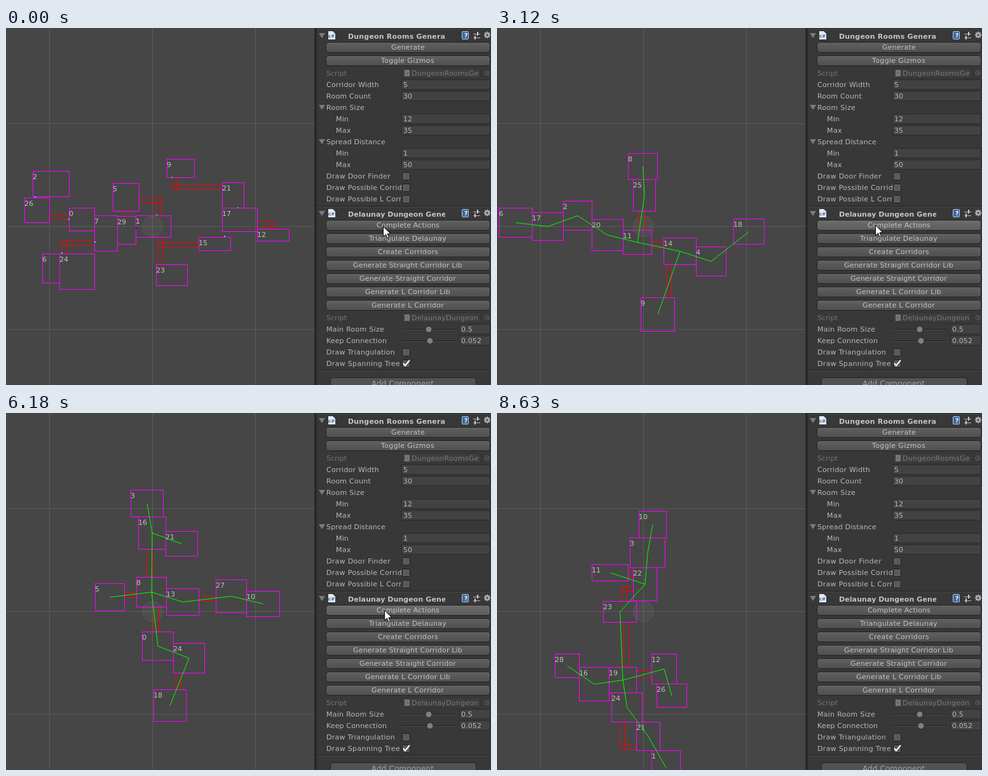
Recreate the animation shown at these times as an HTML page with a canvas. Size 763 by 562 pixels, loop 9.16 s.

```html
<!DOCTYPE html>
<html lang="en">
<head>
<meta charset="utf-8">
<title>Dungeon generator</title>
<style>
html, body { margin: 0; width: 100%; height: 100%; overflow: hidden; background: #464646; }
canvas { display: block; }
</style>
</head>
<body>
<canvas id="stage" width="763" height="562"></canvas>
<script>
const ctx = document.getElementById("stage").getContext("2d");
const LOOP = 9160;
const FONT = '"DejaVu Sans", Verdana, sans-serif';
const MAGENTA = "#ff00ff", RED = "#ff0000", GREEN = "#00ff00", CYAN = "#00ffff", BLUE = "#0000ff";

// ---------- drawing helpers ----------
function rect(x, y, w, h, color) {
  ctx.fillStyle = color;
  ctx.fillRect(x, y, w, h);
}

// Letter spacing that gives a string the length it has with whole-pixel advances
const spacings = new Map();
function snapSpacing(str) {
  const key = ctx.font + str;
  if (!spacings.has(key)) {
    ctx.letterSpacing = "0px";
    let snapped = 0;
    for (const ch of str) snapped += Math.round(ctx.measureText(ch).width + 0.05);
    spacings.set(key, (snapped - ctx.measureText(str).width) / str.length);
  }
  return spacings.get(key);
}

function text(str, x, y, { color = "#b9b9b9", size = 11, bold = false, align = "left", clip = 763 } = {}) {
  ctx.save();
  ctx.beginPath();
  ctx.rect(0, 0, clip, 562);
  ctx.clip();
  ctx.font = `${bold ? "bold " : ""}${size}px ${FONT}`;
  ctx.letterSpacing = snapSpacing(str) + "px";
  if (align === "center") x = Math.round(x - ctx.measureText(str).width / 2);
  ctx.fillStyle = color;
  ctx.fillText(str, x, y);
  ctx.restore();
}

function poly(points, fill, stroke) {
  ctx.beginPath();
  points.forEach(([x, y]) => ctx.lineTo(x, y));
  ctx.closePath();
  if (fill) { ctx.fillStyle = fill; ctx.fill(); }
  if (stroke) { ctx.strokeStyle = stroke; ctx.lineWidth = 1; ctx.stroke(); }
}

function roundBox(x, y, w, h, r, fill, stroke) {
  ctx.beginPath();
  ctx.roundRect(x + 0.5, y + 0.5, w - 1, h - 1, r);
  ctx.fillStyle = fill;
  ctx.fill();
  ctx.strokeStyle = stroke;
  ctx.lineWidth = 1;
  ctx.stroke();
}

function disc(x, y, r, fill, stroke) {
  ctx.beginPath();
  ctx.arc(x, y, r, 0, Math.PI * 2);
  if (fill) { ctx.fillStyle = fill; ctx.fill(); }
  if (stroke) { ctx.strokeStyle = stroke; ctx.lineWidth = 1; ctx.stroke(); }
}

function across(color, x1, x2, ...ys) {
  ys.forEach(y => rect(x1, y, x2 - x1 + 1, 1, color));
}

function down(color, y1, y2, ...xs) {
  xs.forEach(x => rect(x, y1, 1, y2 - y1 + 1, color));
}

// ---------- dungeon ----------
let rooms = new Map();

function room(id, x1, y1, x2, y2) {
  rooms.set(id, { id, x1, y1, x2, y2 });
}

const hall = (...args) => across(RED, ...args);
const shaft = (...args) => down(RED, ...args);

function door(color, x, y) {
  rect(x, y, 2, 2, color);
}

// Paints the rooms, then chains such as "4-8-2 8-5" between room centres
function tree(chains = "") {
  rooms.forEach(({ x1, y1, x2, y2 }) => {
    across(MAGENTA, x1, x2, y1, y2);
    down(MAGENTA, y1, y2, x1, x2);
  });
  rooms.forEach(r => text(String(r.id), r.x1, r.y1 + 13, { color: "#c0c0c0" }));
  ctx.strokeStyle = GREEN;
  ctx.lineWidth = 1;
  for (const chain of chains.split(" ")) {
    ctx.beginPath();
    for (const id of chain.split("-")) {
      const r = rooms.get(Number(id));
      if (r) ctx.lineTo((r.x1 + r.x2) / 2 + 0.5, (r.y1 + r.y2) / 2 + 0.5);
    }
    ctx.stroke();
  }
}

function harbor() {
  room(2, 42, 225, 99, 265);
  room(26, 29, 267, 68, 306);
  room(0, 99, 283, 139, 319);
  room(7, 139, 295, 175, 351);
  room(29, 175, 296, 204, 340);
  room(1, 204, 295, 259, 329);
  room(5, 168, 244, 209, 288);
  room(9, 253, 206, 296, 235);
  room(21, 340, 243, 374, 283);
  room(17, 340, 283, 395, 320);
  room(12, 395, 316, 445, 335);
  room(15, 303, 329, 353, 350);
  room(23, 236, 372, 285, 405);
  room(6, 57, 355, 84, 401);
  room(24, 84, 355, 139, 411);
  hall(68, 99, 293, 301);
  hall(238, 303, 337, 345);
  hall(87, 139, 334, 342);
  shaft(334, 355, 87, 95);
  hall(209, 244, 267, 275);
  shaft(267, 295, 236, 244);
  hall(261, 340, 246, 254);
  shaft(235, 254, 261, 269);
  shaft(288, 296, 186, 194);
  hall(395, 424, 304, 312);
  shaft(304, 316, 416, 424);
  shaft(329, 372, 238, 246);
  tree();
  door(CYAN, 45, 265); door(CYAN, 98, 300); door(CYAN, 139, 336);
  door(CYAN, 87, 353); door(CYAN, 343, 327);
  door(GREEN, 260, 234); door(GREEN, 236, 293); door(GREEN, 364, 282);
  door(BLUE, 204, 314);
}

function bridge() {
  room(2, -52, 318, -6, 366);
  room(1, 5, 312, 45, 361);
  room(15, 45, 274, 102, 325);
  room(22, 102, 282, 157, 325);
  room(7, 157, 291, 210, 342);
  room(20, 196, 243, 237, 291);
  room(19, 185, 178, 233, 214);
  room(12, 225, 214, 277, 243);
  room(24, 277, 186, 327, 243);
  room(27, 248, 291, 295, 333);
  room(25, 295, 338, 348, 364);
  room(5, 403, 251, 437, 306);
  room(10, 235, 369, 278, 414);
  room(0, 241, 414, 293, 468);
  hall(303, 403, 291, 299);
  shaft(291, 338, 316, 324);
  hall(194, 225, 222, 230);
  shaft(214, 230, 194, 202);
  shaft(214, 243, 198, 206);
  hall(237, 285, 275, 283);
  shaft(275, 291, 277, 285);
  hall(278, 342, 380, 388);
  shaft(364, 388, 334, 342);
  tree("2-1-15-22-7-20-19-12-24 20-27-25-5 25-10-0");
}

function tower() {
  room(28, 249, 52, 272, 105);
  room(21, 243, 105, 295, 162);
  room(12, 217, 206, 274, 233);
  room(18, 210, 233, 251, 280);
  room(13, 102, 267, 136, 319);
  room(3, 52, 306, 102, 351);
  room(19, 136, 293, 155, 348);
  room(9, 217, 323, 259, 372);
  room(17, 280, 309, 317, 356);
  room(15, 272, 356, 325, 403);
  room(14, 291, 280, 347, 299);
  room(16, 178, 418, 223, 473);
  room(4, 241, 418, 295, 452);
  room(0, 83, 432, 136, 470);
  room(24, 249, 452, 288, 499);
  shaft(162, 206, 249, 257);
  shaft(280, 323, 236, 244);
  hall(155, 217, 338, 346);
  hall(259, 280, 342, 350);
  shaft(299, 309, 297, 305);
  shaft(403, 418, 274, 282);
  hall(223, 241, 427, 435);
  hall(136, 178, 458, 466);
  tree("28-21-12-18-9-19-13-3 9-17-14 9-15-4-16-0 4-24");
}

function ridge() {
  room(6, 3, 283, 55, 329);
  room(17, 55, 290, 104, 334);
  room(2, 104, 272, 149, 318);
  room(20, 149, 301, 198, 350);
  room(11, 198, 318, 243, 356);
  room(8, 206, 197, 252, 238);
  room(25, 214, 238, 249, 288);
  room(14, 262, 330, 313, 372);
  room(4, 313, 344, 360, 390);
  room(18, 372, 300, 420, 340);
  room(9, 226, 424, 279, 477);
  hall(243, 262, 336, 344);
  shaft(288, 318, 224, 232);
  shaft(372, 424, 266, 274);
  tree("6-17-2-20-11-25-8 11-14-4-18 14-9");
}

function fork() {
  room(0, 125, 251, 181, 285);
  room(22, 181, 286, 219, 338);
  room(16, 219, 262, 262, 298);
  room(21, 219, 329, 261, 384);
  room(15, 165, 338, 219, 367);
  room(5, 87, 338, 125, 390);
  room(14, 227, 384, 280, 424);
  room(12, 262, 424, 319, 476);
  room(8, 298, 337, 332, 387);
  room(23, 298, 298, 345, 337);
  room(26, 298, 249, 338, 298);
  room(7, 345, 257, 397, 298);
  room(1, 345, 298, 397, 345);
  hall(181, 206, 266, 274);
  shaft(266, 286, 198, 206);
  hall(125, 165, 354, 362);
  hall(280, 321, 406, 414);
  shaft(387, 414, 313, 321);
  tree("0-22-16 22-15-5 15-21-14-12 14-8-23-26 23-1-7");
  door(BLUE, 383, 297);
  door(GREEN, 312, 386);
}

function hook() {
  room(29, 212, 146, 266, 180);
  room(10, 243, 180, 267, 236);
  room(28, 267, 217, 324, 236);
  room(18, 249, 262, 304, 301);
  room(22, 248, 301, 303, 342);
  room(1, 240, 342, 285, 385);
  room(12, 285, 342, 338, 393);
  room(4, 240, 393, 296, 440);
  room(14, 186, 393, 240, 431);
  room(23, 147, 379, 167, 435);
  room(19, 112, 337, 167, 379);
  room(7, 348, 251, 405, 301);
  room(11, 348, 301, 405, 351);
  room(13, 348, 351, 398, 406);
  room(26, 405, 311, 440, 366);
  shaft(236, 262, 294, 302);
  shaft(385, 393, 250, 258);
  hall(338, 348, 364, 372);
  hall(167, 186, 418, 426);
  tree("29-10-28-18-22-1-4-14-23-19 22-12 1-12-13-11-7 11-26");
  door(BLUE, 281, 300); door(BLUE, 379, 300); door(BLUE, 286, 382);
}

function spiral() {
  room(3, 196, 121, 247, 163);
  room(16, 208, 163, 251, 214);
  room(21, 251, 186, 301, 225);
  room(8, 205, 258, 252, 305);
  room(13, 252, 276, 303, 318);
  room(5, 140, 268, 186, 311);
  room(27, 330, 262, 378, 314);
  room(10, 378, 280, 430, 320);
  room(0, 214, 344, 263, 389);
  room(24, 263, 362, 312, 409);
  room(18, 232, 435, 283, 485);
  shaft(214, 258, 222, 230);
  hall(186, 205, 282, 290);
  hall(303, 330, 288, 296);
  shaft(305, 344, 232, 240);
  shaft(409, 435, 267, 275);
  tree("3-16-21 16-8-5 8-13-27-10 8-0-24-18");
}

function court() {
  room(1, 155, 112, 204, 165);
  room(23, 249, 108, 290, 160);
  room(2, 227, 160, 271, 202);
  room(11, 270, 160, 324, 202);
  room(5, 324, 160, 371, 202);
  room(21, 217, 202, 262, 241);
  room(15, 215, 241, 238, 295);
  room(19, 154, 238, 206, 270);
  room(27, 113, 261, 136, 314);
  room(29, 155, 295, 204, 329);
  room(7, 204, 295, 259, 329);
  room(18, 296, 280, 329, 337);
  room(25, 277, 332, 296, 385);
  room(3, 371, 274, 419, 320);
  room(4, 371, 355, 423, 395);
  hall(204, 238, 146, 154);
  shaft(138, 160, 230, 238);
  hall(206, 215, 254, 262);
  hall(136, 155, 300, 308);
  hall(329, 371, 288, 296);
  shaft(320, 355, 402, 410);
  shaft(329, 380, 248, 256);
  hall(248, 277, 372, 380);
  hall(296, 326, 342, 350);
  shaft(337, 350, 318, 326);
  tree("1-2-23-11-5 2-11 2-21-15-7-29-27 15-19 7-25-18-3-4");
}

function delta() {
  room(14, 223, 120, 272, 166);
  room(9, 232, 166, 280, 208);
  room(2, 180, 208, 232, 247);
  room(17, 198, 247, 240, 298);
  room(28, 78, 290, 130, 333);
  room(6, 130, 304, 180, 348);
  room(20, 196, 328, 246, 372);
  room(11, 246, 350, 299, 391);
  room(4, 328, 334, 376, 385);
  room(25, 226, 410, 273, 455);
  room(0, 218, 477, 272, 527);
  shaft(298, 328, 208, 216);
  hall(180, 196, 334, 342);
  hall(299, 328, 360, 368);
  shaft(391, 410, 254, 262);
  shaft(455, 477, 240, 248);
  tree("14-9-2-17-20-6-28 20-11-4 11-25-0");
}

function river() {
  room(10, 223, 154, 266, 196);
  room(3, 209, 196, 264, 243);
  room(22, 214, 243, 251, 295);
  room(11, 149, 238, 206, 264);
  room(23, 167, 296, 219, 329);
  room(28, 91, 379, 129, 416);
  room(16, 129, 400, 176, 453);
  room(19, 176, 400, 219, 440);
  room(12, 243, 379, 282, 426);
  room(26, 251, 426, 298, 463);
  room(24, 180, 440, 228, 486);
  room(21, 219, 486, 256, 531);
  room(1, 243, 531, 288, 585);
  hall(206, 214, 250, 258);
  hall(196, 214, 272, 280);
  shaft(272, 296, 196, 204);
  shaft(329, 400, 199, 207);
  shaft(486, 529, 193, 201);
  hall(193, 219, 521, 529);
  hall(219, 243, 406, 414);
  tree("10-3-22-11 22-23-19-16-28 19-12-26 19-24-21-1");
}

function viewport(layout) {
  rect(0, 0, 486, 562, "#464646");
  down("#5a5a5a", 0, 562, 68, 230, 392);
  across("#5a5a5a", 0, 485, 150, 312, 474);
  rooms = new Map();
  ctx.save();
  ctx.beginPath();
  ctx.rect(0, 0, 485, 562);
  ctx.clip();
  disc(230.5, 312.5, 16, "rgba(255,255,255,0.04)", "#585858");
  layout();
  ctx.restore();
}

// ---------- inspector ----------
function button(label, cy, pressed = false) {
  const y = cy - 8;
  const fill = ctx.createLinearGradient(0, y, 0, y + 17);
  fill.addColorStop(0, pressed ? "#6e6e6e" : "#626262");
  fill.addColorStop(1, pressed ? "#5c5c5c" : "#4e4e4e");
  roundBox(503, y, 259, 17, 4, fill, "#222222");
  text(label, 632, cy + 4, { align: "center", color: "#c4c4c4" });
}

function foldout(cy) {
  poly([[492, cy - 4], [502, cy - 4], [497, cy + 4]], "#7b7b7b");
}

function label(str, cy, indent = 0, color) {
  text(str, 504 + indent, cy + 4, { clip: 622, color });
}

function field(str, x, cy) {
  rect(x, cy - 8, 762 - x, 16, "#2a2a2a");
  rect(x + 1, cy - 7, 760 - x, 14, "#424242");
  text(str, x + 3, cy + 4);
}

function row(name, value, cy, indent) {
  label(name, cy, indent);
  field(value, 622, cy);
}

function toggle(name, cy, on = false) {
  label(name, cy);
  roundBox(623, cy - 6, 13, 13, 2, "#5a5a5a", "#1e1e1e");
  if (!on) return;
  ctx.beginPath();
  ctx.moveTo(625, cy);
  ctx.lineTo(628, cy + 3.5);
  ctx.lineTo(635, cy - 5);
  ctx.strokeStyle = "#ffffff";
  ctx.lineWidth = 2;
  ctx.stroke();
}

function slider(name, value, knob, cy) {
  label(name, cy);
  rect(622, cy, 86, 1, "#1e1e1e");
  rect(622, cy + 1, 86, 1, "#505050");
  disc(knob, cy + 0.5, 5, "#808080", "#2a2a2a");
  field(value, 713, cy);
}

function script(name, cy) {
  label("Script", cy, 0, "#757575");
  roundBox(623, cy - 8, 124, 16, 2, "#3d3d3d", "#323232");
  rect(627, cy - 5, 8, 10, "#777777");
  rect(629, cy - 2, 4, 4, "#5a6f88");
  text(name, 638, cy + 4, { clip: 744, color: "#7a7a7a" });
  disc(756.5, cy, 3.5, null, "#686868");
  rect(756, cy - 1, 2, 2, "#686868");
}

function header(name, cy) {
  across("#202020", 489, 762, cy - 12);
  across("#4a4a4a", 489, 762, cy - 11);
  foldout(cy);
  poly([[507, cy - 7], [514, cy - 7], [518, cy - 3], [518, cy + 6], [507, cy + 6]], "#e4e8ee");
  text("c#", 507, cy + 3, { size: 7, bold: true, color: "#2f66a8" });
  text(name, 538, cy + 5, { bold: true, clip: 691, color: "#c4c4c4" });
  roundBox(717, cy - 7, 11, 13, 1, "#3c68a4", "#b9c6da");
  text("?", 723, cy + 3, { size: 9, bold: true, align: "center", color: "#ffffff" });
  across("#b4b4b4", 735, 745, cy - 3, cy + 3);
  rect(741, cy - 6, 2, 6, "#c8c8c8");
  rect(737, cy, 2, 6, "#c8c8c8");
  for (let i = 0; i < 8; i++) {
    const a = i * Math.PI / 4;
    disc(757 + 4.3 * Math.cos(a), cy - 1 + 4.3 * Math.sin(a), 1.1, "#b4b4b4");
  }
  disc(757, cy - 1, 3.8, "#b4b4b4");
  disc(757, cy - 1, 1.6, "#383838");
}

function inspector(pressed) {
  rect(485, 0, 278, 562, "#383838");
  rect(485, 0, 4, 562, "#292929");

  header("Dungeon Rooms Generator", 12);
  button("Generate", 30);
  button("Toggle Gizmos", 51);
  script("DungeonRoomsGenerator", 71);
  row("Corridor Width", "5", 89);
  row("Room Count", "30", 107);
  foldout(125);
  label("Room Size", 125);
  row("Min", "12", 143, 15);
  row("Max", "35", 161, 15);
  foldout(179);
  label("Spread Distance", 179);
  row("Min", "1", 197, 15);
  row("Max", "50", 215, 15);
  toggle("Draw Door Finder", 233);
  toggle("Draw Possible Corridor", 251);
  toggle("Draw Possible L Corridor", 269);

  header("Delaunay Dungeon Generator", 292);
  button("Complete Actions", 310, pressed);
  ["Triangulate Delaunay", "Create Corridors", "Generate Straight Corridor Lib",
    "Generate Straight Corridor", "Generate L Corridor Lib", "Generate L Corridor"]
    .forEach((name, i) => button(name, 331 + 21 * i));
  script("DelaunayDungeonGenerator", 456);
  slider("Main Room Size", "0.5", 665, 474);
  slider("Keep Connection", "0.052", 667, 492);
  toggle("Draw Triangulation", 510);
  toggle("Draw Spanning Tree", 528, true);

  across("#202020", 489, 762, 538);
  across("#4a4a4a", 489, 762, 539);
  roundBox(510, 550, 230, 22, 4, "#525252", "#222222");
  text("Add Component", 624, 564, { size: 12, align: "center", color: "#a0a0a0" });
}

function cursor(x, y) {
  ctx.save();
  ctx.translate(x + 0.5, y + 0.5);
  poly([[0, 0], [0, 16], [4, 12.5], [6.5, 18.5], [9, 17.5], [6.5, 11.5], [11.5, 11.5]], "#ffffff", "#000000");
  ctx.restore();
}

// ---------- timeline ----------
const layouts = [
  [0, harbor], [800, bridge], [1600, tower], [2590, ridge], [3240, fork],
  [4350, hook], [5340, spiral], [6330, court], [7130, delta], [8210, river]
];
const presses = [[680, 800], [2440, 2590], [3120, 3390], [5200, 5340], [6180, 6330], [7010, 7250], [7930, 8210]];
const pointer = [[0, [593, 312]], [150, [595, 310]], [8360, [634, 395]], [8480, [674, 481]], [8630, null]];

const at = (steps, t) => steps.filter(([start]) => start <= t).pop()[1];

function draw(now) {
  const t = now % LOOP;
  viewport(at(layouts, t));
  inspector(presses.some(([from, to]) => t >= from && t < to));
  const tip = at(pointer, t);
  if (tip) cursor(...tip);
}

const began = performance.now();
function tick() {
  draw(performance.now() - began);
  requestAnimationFrame(tick);
}
tick();
</script>
</body>
</html>
```
